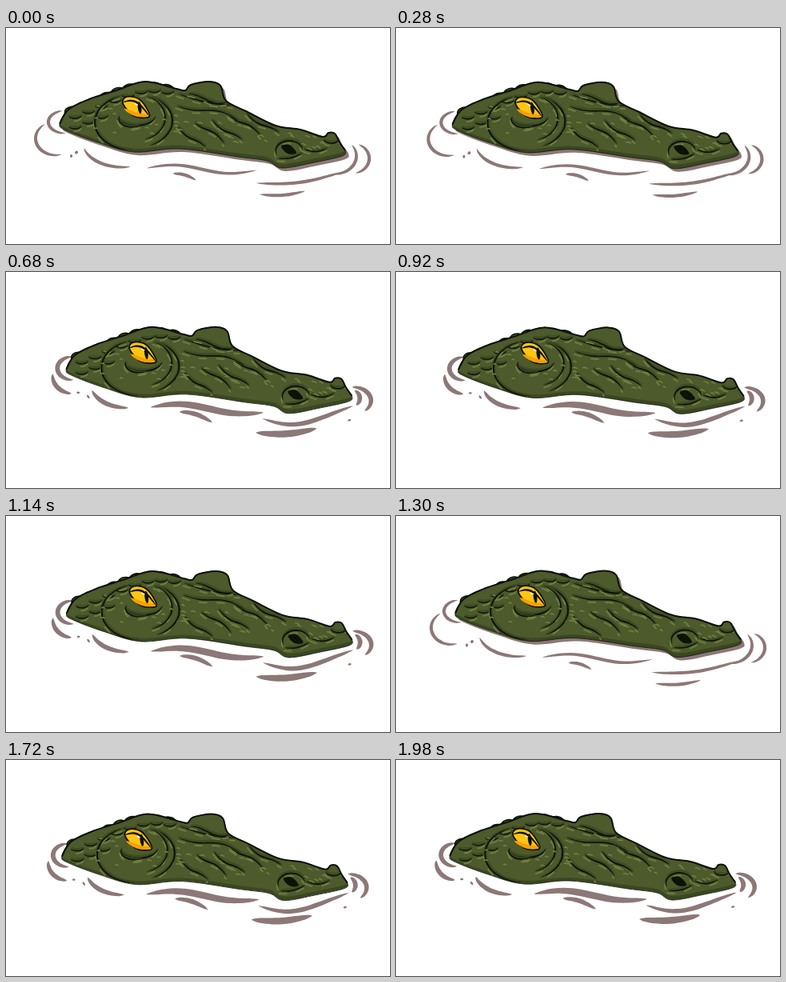
These frames come from a looping animation (480 px wide and 270 px high, 2 s). An HTML page:

```html
<!DOCTYPE html>
<html lang="en">
<head>
<meta charset="utf-8">
<title>Crocodile in the water</title>
<style>
html, body { margin: 0; width: 100%; height: 100%; overflow: hidden; background: #fff; }
svg { display: block; width: 100vw; height: 100vh; }
</style>
</head>
<body>
<svg viewBox="0 0 480 270">
  <defs><clipPath id="bodyClip"></clipPath></defs>
  <g id="scene">
    <g id="wideWater"></g>
    <g id="thickWater"></g>
    <g id="back"></g>
    <g id="skin" clip-path="url(#bodyClip)"></g>
    <g id="edge"></g>
    <g id="openEye"></g>
    <g id="closedEye"></g>
  </g>
</svg>
<script>
const LOOP = 2000, PEAK = 905, REACH = 11, CEL = 125, BLINK_CEL = 11;
const SKIN = '#4c5a2c', SHADE = '#3a4722', LIGHT = '#6f8040', INK = '#0d1107', WATER = '#8c7876';
const layer = id => document.getElementById(id);
const parse = text => text.trim().split(/\s+/).map(p => p.split(',').map(Number));

let seed = 7;
const random = () => (seed = seed * 16807 % 2147483647) / 2147483647;

// Catmull-Rom spline through the points, as cubic segments
function spline(points, closed) {
  const n = points.length;
  const at = i => closed ? points[(i + n) % n] : points[Math.max(0, Math.min(n - 1, i))];
  let d = 'M' + points[0];
  for (let i = 0; i < (closed ? n : n - 1); i++) {
    const [a, b, c, e] = [at(i - 1), at(i), at(i + 1), at(i + 2)];
    const near = b.map((v, k) => (v + (c[k] - a[k]) / 6).toFixed(2));
    const far = c.map((v, k) => (v - (e[k] - b[k]) / 6).toFixed(2));
    d += `C${near} ${far} ${c}`;
  }
  return d + (closed ? 'Z' : '');
}

function addPath(parent, d, attrs) {
  const path = document.createElementNS('http://www.w3.org/2000/svg', 'path');
  path.setAttribute('d', d);
  for (const key in attrs) path.setAttribute(key, attrs[key]);
  parent.append(path);
}

const blob = (parent, text, attrs) => addPath(parent, spline(parse(text), true), attrs);

// Curves map 0..1 to a point; angles are in degrees, clockwise from the right
const arc = (cx, cy, rx, ry, from, to) => u => {
  const angle = (from + (to - from) * u) * Math.PI / 180;
  return [cx + rx * Math.cos(angle), cy + ry * Math.sin(angle)];
};
const sway = (x0, y0, x1, y1, bend = 0, wave = 0) => u => [
  x0 + (x1 - x0) * u,
  y0 + (y1 - y0) * u + bend * Math.sin(Math.PI * u) + wave * Math.sin(2 * Math.PI * u)
];
const shift = (curve, dx, dy) => u => curve(u).map((v, k) => v + (k ? dy : dx));
const sample = (curve, steps = 12) => Array.from({ length: steps + 1 }, (_, i) => curve(i / steps));

// Brush stroke that thins out at both ends
function brush(parent, curve, fill, width, opacity = 1) {
  const points = sample(curve), last = points.length - 1, left = [], right = [];
  points.forEach(([x, y], i) => {
    const [ax, ay] = points[Math.max(0, i - 1)], [bx, by] = points[Math.min(last, i + 1)];
    const length = Math.hypot(bx - ax, by - ay) || 1;
    const half = width / 2 * (.15 + .85 * Math.sqrt(Math.sin(Math.PI * i / last) + 1e-9));
    const nx = (ay - by) / length * half, ny = (bx - ax) / length * half;
    left.push([x + nx, y + ny]);
    right.unshift([x - nx, y - ny]);
  });
  addPath(parent, spline(left.concat(right), true), { fill, opacity });
}

// Skin crease: soft shadow on one side, broken highlight on the other
function fold(parent, curve, width = 1.7) {
  brush(parent, shift(curve, .5, -1.5), SHADE, 4.5, .75);
  addPath(parent, spline(sample(shift(curve, -1, 3.4))), {
    fill: 'none', stroke: LIGHT, 'stroke-width': 1.8, 'stroke-linecap': 'round', 'stroke-dasharray': '9 13'
  });
  brush(parent, curve, INK, width);
}

const TOP = `67,120 78,102 104,89 138,78 174,67 213,76 224,78 231,71 254,67 268,72 275,91
  300,104 337,122 368,127 396,136 403,131 411,132 417,143 424,153`;
const BOTTOM = '420,160 385,168 345,175 326,166 290,161 217,151 160,155 115,143 75,128';
const BODY = spline(parse(TOP + ' ' + BOTTOM), true);
const BACK = sway(78, 102, 210, 75, -13, 3);

function drawWideWater(g) {
  addPath(g, BODY, { fill: WATER, transform: 'translate(4 4)' });
  [
    arc(62, 138, 25, 21, 235, 75), arc(73, 117.5, 20, 14, 260, 88), arc(146, 143, 50, 31, 165, 80),
    sway(177, 175, 312, 178, 0, -4.5), sway(209, 182, 237, 190, -2.5), sway(318, 208, 373, 204, 3),
    sway(314, 194, 420, 180, 6), arc(409, 160, 29, 23, 85, -35), arc(432, 163, 22, 19, -65, 75),
    sway(87, 154, 89, 157), sway(80, 160, 83, 160)
  ].forEach(curve => brush(g, curve, WATER, 4.2));
}

function drawThickWater(g) {
  [
    arc(75, 118.5, 19, 14.5, 265, 90), arc(75, 128, 25, 22, 185, 95), arc(144, 139, 46, 29, 165, 90),
    sway(209, 173, 249, 186, -3.5), sway(314, 182, 424, 166, 12, 2),
    arc(425, 159, 23, 17, -90, 48), arc(422, 156, 12, 11, -60, 50)
  ].forEach(curve => brush(g, curve, WATER, 5.8));
  [sway(174, 167, 312, 174, -2, -4), sway(305, 199, 379, 194, 4)]
    .forEach(curve => brush(g, curve, WATER, 8.5));
  [sway(93, 152, 96, 156), sway(80, 149, 84, 149), sway(419, 184, 423, 183)]
    .forEach(curve => brush(g, curve, WATER, 2.5));
}

function drawBack(g) {
  for (let i = 0; i < 9; i++) {
    const [x, y] = BACK((i + .3) / 9), size = 7 + i % 3;
    addPath(g, spline(sample(arc(x, y + size - 2, size + 2, size, 0, 330)), true),
      { fill: SKIN, stroke: INK, 'stroke-width': 1.6 });
  }
}

function drawSkin(g) {
  addPath(g, BODY, { fill: SHADE });
  addPath(g, BODY, { fill: SKIN, transform: 'translate(0 -6)' });
  addPath(g, BODY, { fill: SKIN, transform: 'translate(0 2) scale(1 .96)' });

  // Rows of scales on the neck and back
  for (let row = 0; row < 2; row++)
    for (let i = 0; i < 8 - row * 5; i++) {
      const [x, y] = BACK(i / 8);
      fold(g, arc(x + 8, y + 6 + row * 13, 9, 5, 20, 150), 1.5);
    }

  // Eye mound
  fold(g, arc(160, 118, 49, 35, 250, 95), 2);
  fold(g, arc(160, 116, 48, 34, -62, 65), 2);
  fold(g, arc(165, 112, 34, 28, -70, 75));
  fold(g, arc(163, 109, 24, 13, 10, 165), 2);
  fold(g, arc(158, 114, 17, 10, 60, 200));

  // Ridges fanning from the cheek to the nose
  for (let i = 0; i <= 4; i++) {
    const k = i / 4;
    fold(g, sway(214 + 86 * k, 122 - 16 * k, 250 + 92 * k, 149 - 18 * k, i % 2 ? -3 : 3, 2), 2);
  }
  fold(g, sway(214, 82, 284, 97, 3));
  fold(g, sway(228, 82, 276, 93, 3, -2));
  fold(g, sway(213, 97, 290, 115, -3, 3));

  // Nose and mouth
  fold(g, arc(354, 154, 17, 13, 160, 350), 2);
  fold(g, sway(340, 163, 371, 156, 3));
  fold(g, arc(407, 138, 10, 6, 170, 20));
  fold(g, sway(372, 151, 402, 150, 4));
  blob(g, '344,148 354,146 363,156 352,157', { fill: INK });

  // Scattered glints that follow the slope of the head
  for (let i = 0; i < 36; i++) {
    const u = random(), x = 110 + 300 * u, y = 100 + 44 * u + (random() - .3) * 42 * (1 - .6 * u);
    brush(g, sway(x, y, x + 4 + 4 * random(), y + 3 * u, -1), LIGHT, 1.8);
  }
}

function drawEdge(g) {
  const stroke = { fill: 'none', stroke: INK, 'stroke-linejoin': 'round' };
  addPath(g, spline(parse(TOP)), { ...stroke, 'stroke-width': 2 });
  addPath(g, BODY, { ...stroke, 'stroke-width': .8 });
}

const EYE = '146,94 151,86 165,88 175,99 179,111 160,110';

function drawOpenEye(g) {
  blob(g, EYE, { fill: '#ffc414', stroke: INK, 'stroke-width': 1.8 });
  brush(g, sway(148, 101, 178, 109, 3), '#f7a000', 5);
  brush(g, sway(166, 92, 168, 107), INK, 4.5);
  brush(g, sway(161, 93, 166, 95), '#fff5dc', 5);
  brush(g, sway(146, 93, 179, 110, -9), INK, 2.6);
}

function drawClosedEye(g) {
  blob(g, EYE, { fill: SKIN, stroke: SKIN, 'stroke-width': 3 });
  [-11, -4, 5].forEach(bend => fold(g, sway(147, 99, 180, 111, bend), 1.8));
}

drawWideWater(layer('wideWater'));
drawThickWater(layer('thickWater'));
drawBack(layer('back'));
addPath(layer('bodyClip'), BODY);
drawSkin(layer('skin'));
drawEdge(layer('edge'));
drawOpenEye(layer('openEye'));
drawClosedEye(layer('closedEye'));

const show = (id, visible) => layer(id).setAttribute('visibility', visible ? 'visible' : 'hidden');

function update(time) {
  const t = time % LOOP, cel = Math.floor(t / CEL);
  const drift = REACH * (t < PEAK ? t / PEAK : (LOOP - t) / (LOOP - PEAK));
  layer('scene').setAttribute('transform', `translate(${drift.toFixed(2)} ${(drift * .22).toFixed(2)})`);
  show('wideWater', cel % 2 === 0);
  show('thickWater', cel % 2 === 1);
  show('openEye', cel !== BLINK_CEL);
  show('closedEye', cel === BLINK_CEL);
}

const start = performance.now();
function tick(now) {
  update(Math.max(0, now - start));
  requestAnimationFrame(tick);
}
update(0);
requestAnimationFrame(tick);
</script>
</body>
</html>
```
